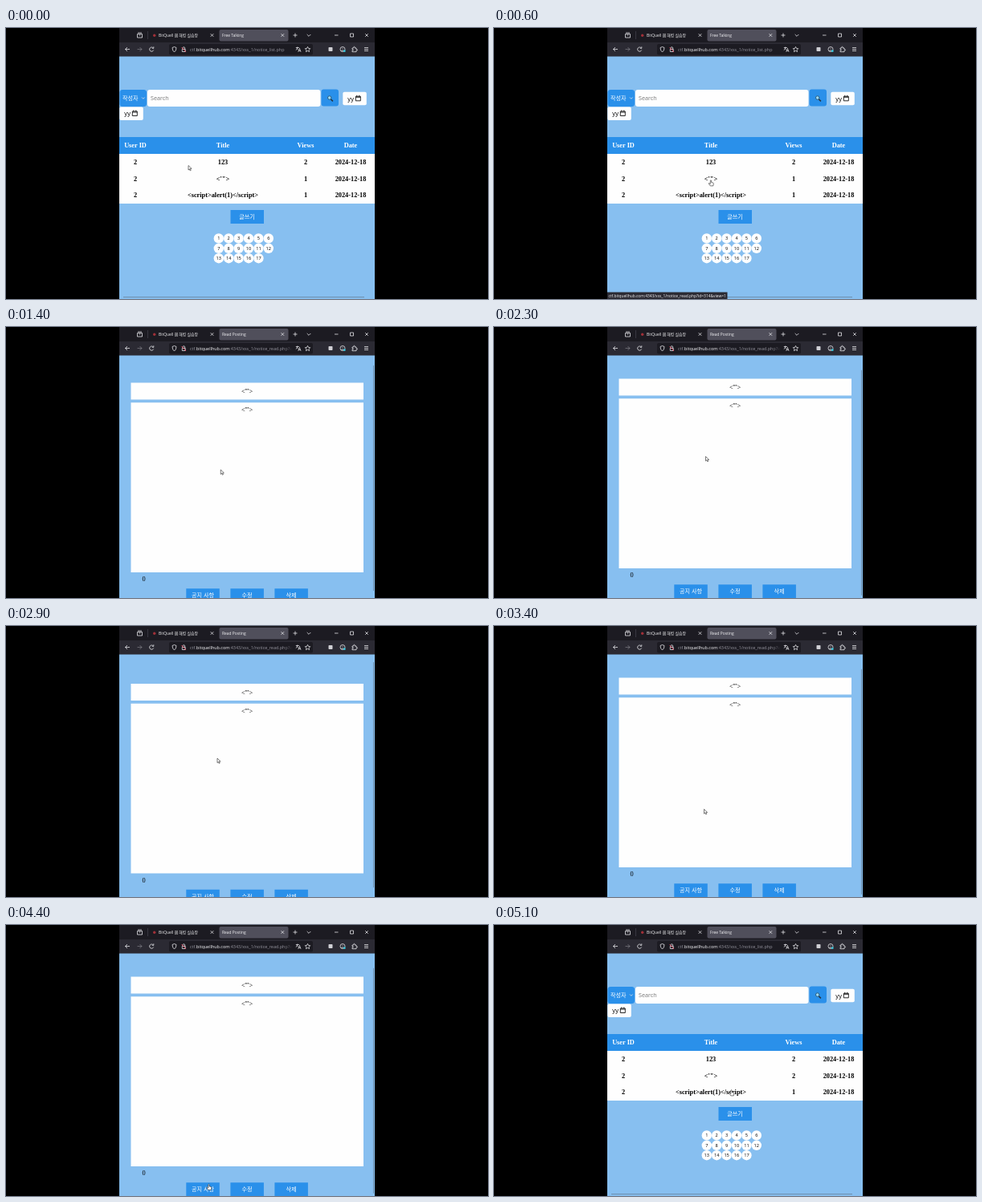
Write an HTML page that moves like this. It is 600 px wide and 338 px high and loops after 5.2 s.

```html
<!DOCTYPE html>
<html lang="ko">
<head>
<meta charset="utf-8">
<title>Notice board</title>
<style>
html, body { margin: 0; width: 100%; height: 100%; overflow: hidden; background: #000; }
svg { display: block; font-family: "Open Sans", "Noto Sans CJK KR", sans-serif; }
.serif { font: 8.3px "Liberation Serif", serif; }
.bold { font-weight: bold; }
.mid { text-anchor: middle; }
.ko { font-size: 7.1px; fill: #fff; }
.ui { font-size: 4.9px; fill: #f4f4f6; }
.url { font-size: 5.45px; fill: #96959f; }
.line { fill: none; stroke: #e4e4e8; stroke-width: .8; }
.blue { fill: #2a90ea; }
.white { fill: #fefefe; }
</style>
</head>
<body>
<svg width="600" height="338" viewBox="0 0 600 338">
  <defs>
    <clipPath id="window"><path d="M141 0h318v338H141z"/></clipPath>
    <linearGradient id="fade"><stop stop-color="#1c1b22" stop-opacity="0"/><stop offset="1" stop-color="#1c1b22"/></linearGradient>
    <g id="date">
      <rect class="white" width="29.5" height="16.5" rx="2"/>
      <text x="6" y="10.8" font-size="7.6">yy</text>
      <path d="M16 5.5h6v5.5h-6zM16 6.5h6M17.5 4v1.5M20.5 4v1.5" fill="none" stroke="#111" stroke-width=".9"/>
    </g>
    <path id="cross" class="line" d="M-1.8-1.8 1.8 1.8M1.8-1.8-1.8 1.8"/>
  </defs>
  <g clip-path="url(#window)">
    <path fill="#87bff0" d="M141 35h318v303H141z"/>

    <g id="list">
      <rect class="blue" x="141.5" y="77" width="33.5" height="21" rx="3.5"/>
      <text class="ko" x="145" y="90.2">작성자</text>
      <path class="line" d="m169 86.5 1.8 1.8 1.8-1.8"/>
      <rect class="white" x="176" y="77" width="215.5" height="21" rx="3"/>
      <text x="180" y="90.2" font-size="7.2" fill="#777">Search</text>
      <rect class="blue" x="392.5" y="76.5" width="21.5" height="21" rx="3"/>
      <path d="m404.3 88.8 2.6 2.6" stroke="#26323d" stroke-width="1.5"/>
      <circle cx="402.7" cy="87" r="2.2" fill="#9fdcff" stroke="#28566f" stroke-width=".9"/>
      <use href="#date" x="419.3" y="79.8"/>
      <use href="#date" x="141.3" y="98.5"/>
      <path class="blue" d="M141 136h318v21H141z"/>
      <path class="white" d="M141 157h318v62H141z"/>
      <g id="table" class="serif bold mid"></g>
      <path class="blue" d="M279.5 227H321v17h-41.5z"/>
      <text class="ko mid" x="300" y="238.2">글쓰기</text>
      <g id="pages" class="mid" font-size="5.6"></g>
      <path d="M146 335.7h300" stroke="#6c8ca9"/>
      <g id="status">
        <path fill="#2b2a33" d="M141 329.5h149.5V338H141z"/>
        <text x="142.5" y="335.6" class="ui">ctf.bitquellhub.com:4343/xss_1/notice_read.php?id=314&amp;view=1</text>
      </g>
    </g>

    <g id="read">
      <g id="content">
        <path class="white" d="M155.5 76.5H445v21H155.5zM155.5 101.3H445V313H155.5z"/>
        <g class="serif mid">
          <text x="300" y="90">&lt;'"&gt;</text>
          <text x="300" y="113">&lt;'"&gt;</text>
          <text x="171.7" y="324">0</text>
        </g>
        <path class="blue" d="M224.3 333.2h41.5v17h-41.5zM279.4 333.2h41.5v17h-41.5zM334.4 333.2h41.5v17h-41.5z"/>
        <g class="ko mid">
          <text x="245" y="344.3">공지 사항</text>
          <text x="300" y="344.3">수정</text>
          <text x="355" y="344.3">삭제</text>
        </g>
      </g>
      <path id="thumb" d="M457.5 40v281" stroke="#6c8ca9"/>
    </g>

    <path fill="#1c1b22" d="M141 0h318v18H141z"/>
    <path fill="#2b2a33" d="M141 18h318v17.5H141z"/>
    <path class="line" d="M163.5 7.5h6v4.5h-6zM164 6h5M165.5 9h2"/>
    <path d="M176.5 4v10" stroke="#45444e" stroke-width=".7"/>
    <circle cx="184.7" cy="9.2" r="1.7" fill="#a03038"/>
    <text class="ui" x="190" y="11">BitQuell 웹 해킹 실습장</text>
    <use href="#cross" x="256.5" y="9"/>
    <rect x="265.5" y="2" width="86" height="14.5" rx="2" fill="#504f5b"/>
    <rect id="flash" x="265.5" y="2" width="86" height="14.5" rx="2" fill="#4a6080"/>
    <text id="title" class="ui" x="269" y="11"></text>
    <use href="#cross" x="344.3" y="9"/>
    <path class="line" d="M357.5 9h5M360 6.5v5M374.7 8l2.3 2.3L379.300 8M409 9h4.500M428.500 7h4v4h-4z"/>
    <use href="#cross" x="449" y="9"/>

    <path class="line" d="M154 26.500h-5.500m2.500-2.500-2.500 2.500 2.500 2.500M183.300 25a2.600 2.600 0 1 0 .4 2.500M183.800 23.300v2h-2"/>
    <path class="line" opacity=".4" d="M163.500 26.500h5.500m-2.500-2.500 2.500 2.500-2.500 2.500"/>
    <rect x="203" y="20" width="179" height="13.500" rx="2" fill="#1c1b22"/>
    <path class="line" d="M207 24.500l2.500-1 2.500 1q0 4-2.500 5.500-2.500-1.500-2.500-5.500zM219.300 26.500h4v3h-4zM220 26.500v-1.500a1.300 1.300 0 0 1 2.600 0v1.500"/>
    <path d="M218.500 24l5.500 6" stroke="#e2425a" stroke-width=".9"/>
    <text class="url" x="229" y="28.600">ctf.<tspan fill="#fbfbfe">bitquellhub.com</tspan>:4343/xss_1/<tspan id="file"></tspan></text>
    <path fill="url(#fade)" d="M346 21h11v11h-11z"/>
    <path fill="#1c1b22" d="M357 21h24v11h-24z"/>
    <path class="line" d="M360.800 24.500h4M362.800 23.500v1q-.3 2-2 3M362 25.500l1.700 1.500M363.800 29.800l1.600-4.300 1.600 4.300M364.400 28.400h2"/>
    <path class="line" d="m375.500 23.400 1 2 2.200.3-1.600 1.600.4 2.300-2-1.100-2 1.100.4-2.300-1.600-1.600 2.200-.3z"/>
    <rect x="401.500" y="24" width="5" height="5" rx=".8" fill="#d0d0d5"/>
    <circle class="line" cx="419" cy="26.500" r="3"/>
    <path class="line" d="M417.200 28.700q1.800-2 3.600 0M419 25.200v.8"/>
    <circle cx="421.300" cy="28.700" r="1.400" fill="#38c6dc"/>
    <path class="line" d="M431 25h1.700q-.3-1.700.8-1.700t.8 1.700h1.700v1.700q1.500-.2 1.500.7t-1.500.7v1.600h-5v-1.700q1.400.1 1.400-.7t-1.400-.6z"/>
    <path class="line" d="M446 24.500h5M446 26.500h5M446 28.500h5"/>

    <g id="cursor" fill="#fff" stroke="#222" stroke-width=".6" stroke-linejoin="round">
      <path id="arrow" d="M0 0v5.600l1.300-1.200.9 2 1-.4-.9-2 1.800-.1z"/>
      <path id="hand" d="M-.7.700q.7-1.200 1.300 0v2.300l2 .5q.8.300.7 1.200l-.5 2.700h-3.500l-2-2.700q-.1-.9.700-.6l1.300.9z"/>
    </g>
  </g>
</svg>
<script>
const LOOP = 5200, STEP = 100;
const OPEN = 800, BACK = 4500;
const $ = id => document.getElementById(id);
const show = (id, on) => $(id).setAttribute('display', on ? 'inline' : 'none');
const move = (id, x, y) => $(id).setAttribute('transform', `translate(${x} ${y})`);
const within = (t, from, to) => t >= from && t < to;

const pointer = [
  [0, 227, 171.5], [500, 270, 189.5], [700, 270, 189.5], [1000, 268.5, 183.5],
  [1300, 268.5, 183.5], [1700, 263.5, 161.5], [2700, 263.5, 161.5], [2900, 263, 165],
  [3300, 264.5, 197], [3700, 252.5, 323], [4000, 252.5, 323], [4100, 266.5, 299],
  [4200, 252.5, 323], [4400, 252.5, 323], [4900, 293, 230], [5100, 295.5, 205.5]
];
const scroll = [
  [0, 0], [1200, 0], [1400, -7], [1700, -12], [2500, -12], [2600, 0],
  [2700, 0], [2900, -4.5], [3100, -10.5], [3300, -12]
];
const handTimes = [[400, OPEN], [3700, 4100], [4200, BACK], [4900, 5000], [5100, LOOP]];

// Linear interpolation between [time, ...values] keys.
function sample(keys, t) {
  const next = keys.findIndex(key => key[0] > t);
  if (next < 0) return keys.at(-1).slice(1);
  const a = keys[next - 1], b = keys[next], k = (t - a[0]) / (b[0] - a[0]);
  return a.slice(1).map((v, i) => v + (b[i + 1] - v) * k);
}

function addText(parent, x, y, text) {
  const node = document.createElementNS('http://www.w3.org/2000/svg', 'text');
  node.setAttribute('x', x);
  node.setAttribute('y', y);
  node.textContent = text;
  $(parent).append(node);
  return node;
}

const columns = [161, 270, 373, 429];
const rows = [
  ['User ID', 'Title', 'Views', 'Date'],
  ['2', '123', '2', '2024-12-18'],
  ['2', '<\'">', '1', '2024-12-18'],
  ['2', '<script>alert(1)<\/script>', '1', '2024-12-18']
];
const cells = rows.map((row, r) => row.map((text, c) => addText('table', columns[c], 149 + r * 20.8, text)));
cells[0].forEach(cell => cell.setAttribute('fill', '#fff'));

for (let i = 0; i < 17; i++) {
  const x = 264.8 + i % 6 * 12.4, y = 262.4 + Math.floor(i / 6) * 12.4;
  const dot = document.createElementNS('http://www.w3.org/2000/svg', 'circle');
  Object.entries({ cx: x, cy: y, r: 6.2, class: 'white' }).forEach(([k, v]) => dot.setAttribute(k, v));
  $('pages').append(dot);
  addText('pages', x, y + 2, i + 1);
}

function draw(now) {
  const t = Math.floor(now % LOOP / STEP) * STEP;
  const reading = within(t, OPEN, BACK);
  show('list', !reading);
  show('read', reading);
  show('status', within(t, 500, OPEN));
  $('title').textContent = reading ? 'Read Posting' : 'Free Talking';
  $('file').textContent = reading ? 'notice_read.php?id=314' : 'notice_list.php';
  cells[2][2].textContent = t < BACK ? '1' : '2';

  const sinceLoad = t - (t < BACK ? OPEN : BACK);
  $('flash').setAttribute('opacity', sinceLoad < 0 ? 0 : Math.max(0, 1 - sinceLoad / 400));

  const [offset] = sample(scroll, t);
  move('content', 0, offset);
  move('thumb', 0, -offset * 1.15);

  move('cursor', ...sample(pointer, t));
  const hand = handTimes.some(([from, to]) => within(t, from, to));
  show('hand', hand);
  show('arrow', !hand);
}

const start = performance.now();
function tick() {
  draw(performance.now() - start);
  requestAnimationFrame(tick);
}
tick();
</script>
</body>
</html>
```
